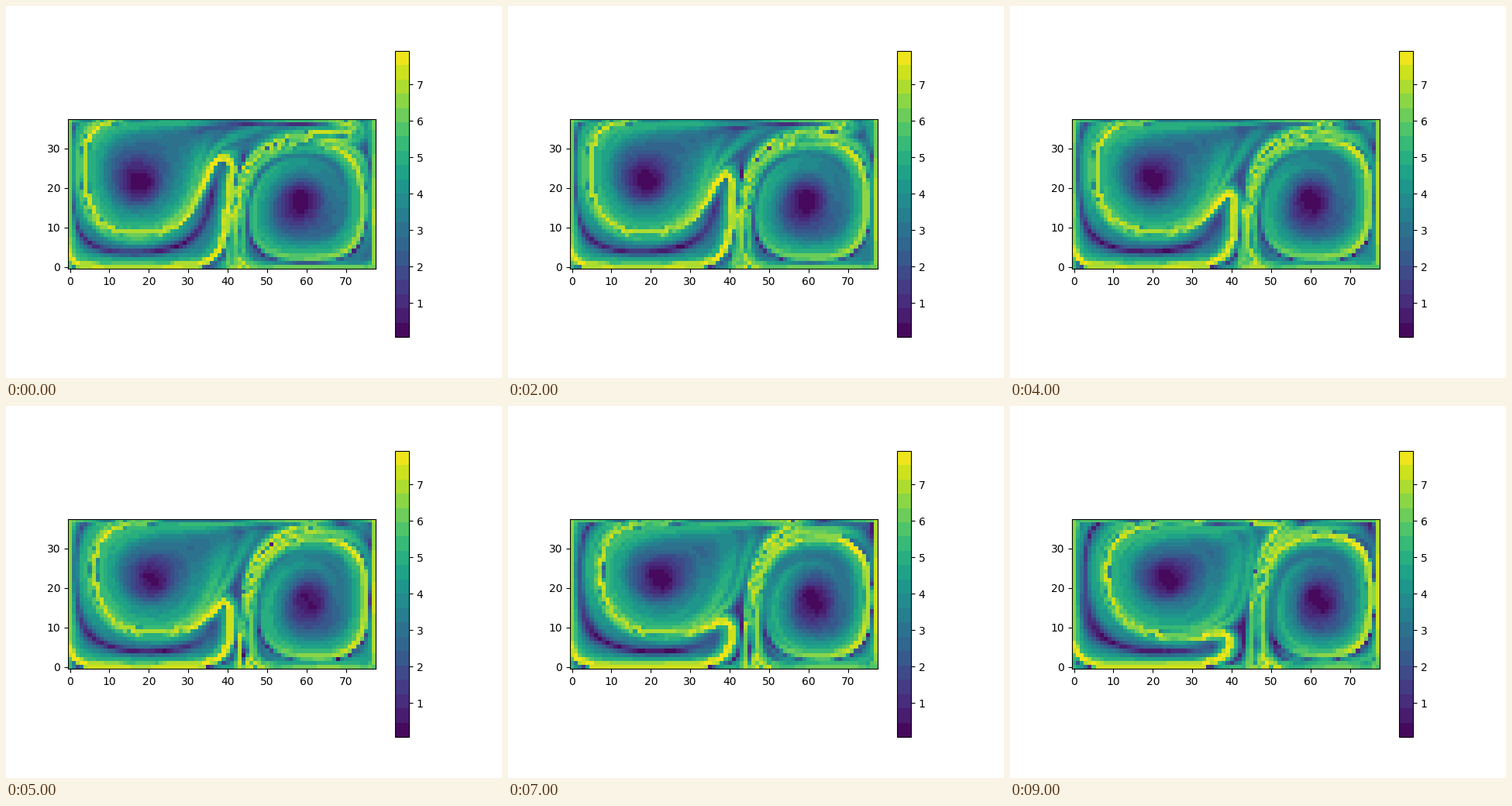
Recreate the animation shown at these times as a matplotlib script. Size 640 by 480 pixels, loop 10 s.

```python
import numpy as np
import matplotlib.pyplot as plt
from matplotlib.animation import FuncAnimation
from matplotlib.cm import ScalarMappable
from matplotlib.colors import ListedColormap, Normalize

# Stretching field (log of the largest Cauchy-Green eigenvalue) of a double gyre
AMP, EPS, OMEGA = 0.2, 0.25, 2 * np.pi / 10
SPAN, STEP = 10.0, 0.05
FRAMES, FRAME_DT = 10, 0.1
NX, NY = 80, 40

xs = np.linspace(0, 2, NX)
ys = np.linspace(0, 1, NY)


def velocity(x, y, t):
    a = EPS * np.sin(OMEGA * t)
    b = 1 - 2 * a
    f = np.pi * (a * x + b) * x
    u = -np.pi * AMP * np.sin(f) * np.cos(np.pi * y)
    v = np.pi * AMP * np.cos(f) * np.sin(np.pi * y) * (2 * a * x + b)
    return u, v


def flow_map(t):
    """Carry the whole grid forward over SPAN with RK4."""
    x, y = np.meshgrid(xs, ys)
    h = STEP
    for _ in range(round(SPAN / h)):
        u1, v1 = velocity(x, y, t)
        u2, v2 = velocity(x + h / 2 * u1, y + h / 2 * v1, t + h / 2)
        u3, v3 = velocity(x + h / 2 * u2, y + h / 2 * v2, t + h / 2)
        u4, v4 = velocity(x + h * u3, y + h * v3, t + h)
        x = x + h / 6 * (u1 + 2 * u2 + 2 * u3 + u4)
        y = y + h / 6 * (v1 + 2 * v2 + 2 * v3 + v4)
        t += h
    return x, y


def gradient(p):
    px = (p[1:-1, 2:] - p[1:-1, :-2]) / (xs[2] - xs[0])
    py = (p[2:, 1:-1] - p[:-2, 1:-1]) / (ys[2] - ys[0])
    return px, py


def stretching(t):
    x, y = flow_map(t)
    xx, xy = gradient(x)
    yx, yy = gradient(y)
    c11 = xx**2 + yx**2
    c22 = xy**2 + yy**2
    c12 = xx * xy + yx * yy
    top = (c11 + c22) / 2 + np.hypot((c11 - c22) / 2, c12)
    return np.log(top)


fields = [stretching(k * FRAME_DT) for k in range(FRAMES)]
bands = ListedColormap(plt.get_cmap("viridis")((np.arange(20) + 0.5) / 20))

fig, ax = plt.subplots(figsize=(6.4, 4.8), dpi=100)
image = ax.imshow(fields[0], origin="lower", cmap=bands)
fig.colorbar(ScalarMappable(Normalize(0.07, 7.925), bands), ax=ax)


def update(k):
    # each field fills the whole colour range
    image.set_data(fields[k])
    image.autoscale()
    return (image,)


anim = FuncAnimation(fig, update, frames=FRAMES, interval=1000,
                     repeat=True, repeat_delay=0)
plt.show()
```
